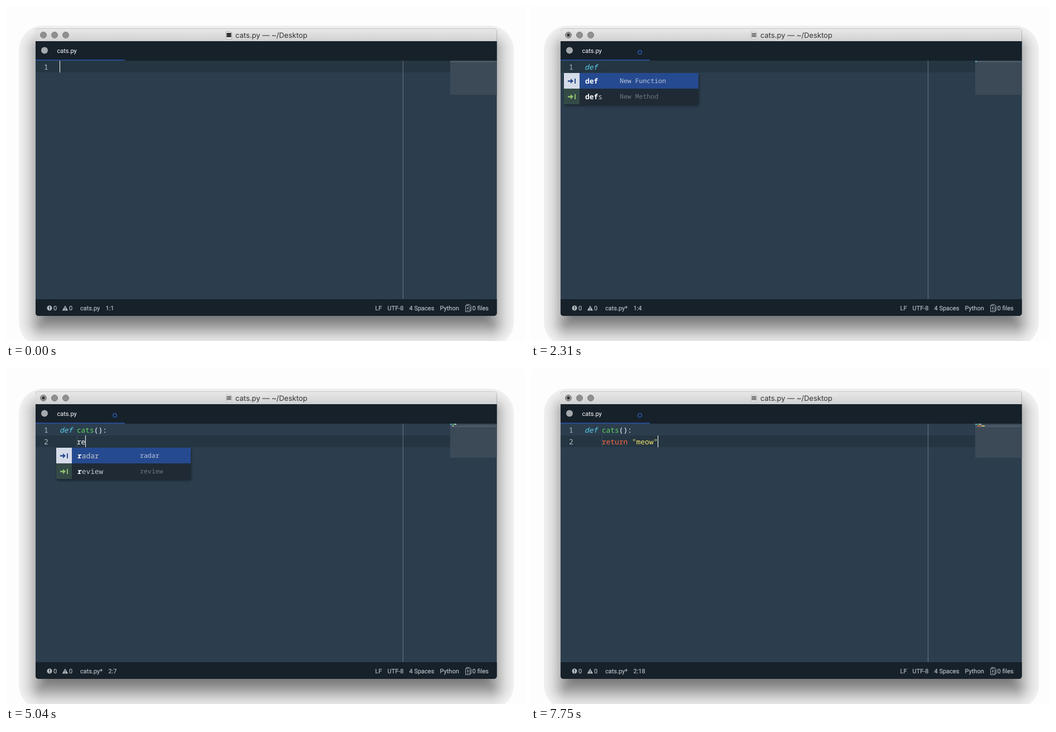
An HTML page for the animation above (8000 ms loop, 930 px wide and 600 px high).

```html
<!DOCTYPE html>
<html lang="en">
<head>
<meta charset="utf-8">
<title>Editor typing</title>
<style>
html, body { margin: 0; width: 100%; height: 100%; overflow: hidden; background: #fdfdfd; }
svg { display: block; width: 930px; height: 600px; text-rendering: geometricPrecision; }
text { white-space: pre; }
.title { font: 13px Inter, sans-serif; fill: #333; }
.ui { font: 11px Roboto, sans-serif; fill: #b5bcc0; stroke: #b5bcc0; stroke-width: .2px; }
.ui.tab { fill: #fff; stroke: none; }
.code { font: 500 12.87px "Noto Sans Mono", monospace; fill: #fff; }
.code .def { fill: #5cd1ee; font-style: italic; }
.code .fn { fill: #5fd35a; }
.code .ret { fill: #ff6743; }
.code .str { fill: #f4e26c; }
.num { font-weight: 400; fill: #b3bdc1; }
.word { font-weight: 400; fill: #c3c9cf; }
.word .hit { font-weight: 700; fill: #fff; }
.note { font: 11.53px "Noto Sans Mono", monospace; fill: #6c777f; }
.note.on { fill: #bcc8df; }
.popup { filter: drop-shadow(1px 2px 2px rgba(0, 0, 0, .4)); }
</style>
</head>
<body>
<svg viewBox="0 0 930 600">
  <defs>
    <linearGradient id="bar" x2="0" y2="1">
      <stop offset="0" stop-color="#e9e9e9"/><stop offset="1" stop-color="#d1d1d1"/>
    </linearGradient>
    <clipPath id="frame"><rect x="53" y="40" width="826.5" height="515" rx="5"/></clipPath>
  </defs>
  <g id="shadow"></g>
  <g clip-path="url(#frame)">
    <rect x="53" y="40" width="827" height="516" fill="#2c3e4e"/>
    <rect x="53" y="40" width="827" height="23" fill="url(#bar)"/>
    <rect x="53" y="40" width="827" height="1" fill="#c9c9c9"/>
    <g fill="#8f8f8f" stroke="#7f7f7f">
      <circle cx="67" cy="52" r="5.5"/><circle cx="87" cy="52" r="5.5"/><circle cx="107" cy="52" r="5.5"/>
    </g>
    <circle id="closeDot" cx="67" cy="52" r="2.4" fill="#2b2b2b"/>
    <g id="docIcon">
      <path d="M394.5 45.5h7l3 3v10.500h-10z" fill="#fafafa" stroke="#a5a5a5"/>
      <rect x="395.500" y="48" width="8" height="8" fill="#333"/>
    </g>
    <text class="title" x="411" y="57">cats.py — ~/Desktop</text>
    <rect x="53" y="63" width="827" height="35" fill="#17212a"/>
    <rect x="53" y="96" width="160" height="2" fill="#274b8f"/>
    <circle cx="69" cy="79.500" r="6" fill="#a4aaae"/>
    <text class="ui tab" x="91.500" y="84">cats.py</text>
    <circle id="tabDot" cx="195" cy="83" r="3.300" fill="none" stroke="#2a56a6" stroke-width="1.500"/>
    <g id="editor"></g>
    <rect x="53" y="525" width="827" height="31" fill="#17212a"/>
    <circle cx="78" cy="541" r="4.500" fill="#b5bcc0"/>
    <path d="M77.300 538h1.500v3.500h-1.500zM77.300 542.500h1.500v1.500h-1.500z" fill="#17212a"/>
    <path d="M106 536.500l5.200 9h-10.400z" fill="#b5bcc0"/>
    <path d="M105.400 539.500h1.200v3h-1.200zM105.400 543.300h1.200v1.200h-1.200z" fill="#17212a"/>
    <path d="M825.500 536.500v-2h5l3 3v8h-2M823.500 536.500h6l2 2v9h-8zM825.500 541h4M827.500 539v4M825.500 545h4" fill="none" stroke="#b5bcc0" stroke-width=".9"/>
    <g id="status"></g>
  </g>
</svg>
<script>
const LOOP = 8000, CHAR = 7.72, LEFT = 96, LINE = 21;
const $ = id => document.getElementById(id);
const rect = (x, y, w, h, fill, more = '') =>
  `<rect x="${x}" y="${y}" width="${w}" height="${h}" fill="${fill}" ${more}/>`;
const text = (cls, x, y, s) => `<text class="${cls}" x="${x}" y="${y}">${s}</text>`;

const snippets = {
  dc: 'Dictionary Comprehension', debug: 'debug', def: 'New Function', defs: 'New Method',
  class: 'New Class', combak: 'combak', radar: 'radar', review: 'review'
};
// x, width, description offset, typed letters, words
const popups = {
  d: [59, 273, 89, 'd', 'dc debug def defs'],
  de: [59, 241, 109, 'de', 'debug def defs'],
  def: [59, 241, 100, 'def', 'def defs'],
  c: [90, 241, 127, 'c', 'class combak'],
  ca: [90, 241, 127, 'ca', 'class combak'],
  r: [90, 241, 150, 'r', 'radar review'],
  re: [90, 241, 150, 're', 'review']
};

// time, text, column, popup, cursor hidden
const head = 'def cats():\n    ';
const steps = [
  [0, '', 1], [420, '', 1, '', 1],
  [710, 'd', 2, 'd'], [890, 'de', 3, 'de'], [1190, 'def', 4, 'def'],
  [1480, 'def', 4, 'def', 1], [1860, 'def', 4, 'def'], [2310, 'def', 4, 'def', 1],
  [2490, 'def ', 5], [2750, 'def c', 6, 'c'], [2930, 'def ca', 7, 'ca'],
  [3040, 'def cat', 8], [3160, 'def cats', 9],
  [3460, 'def cats()', 10], [3730, 'def cats()', 10, '', 1], [3940, 'def cats()', 11],
  [4300, 'def cats():', 12], [4570, head, 5],
  [4920, head + 'r', 6, 'r'], [5020, head + 're', 7, 'r'], [5130, head + 're', 7, 're'],
  [5340, head + 'ret', 8], [5460, head + 'retu', 9], [5580, head + 'return', 11],
  [5700, head + 'return ', 12], [6000, head + 'return ""', 13],
  [6170, head + 'return "m"', 14], [6290, head + 'return "me"', 15],
  [6560, head + 'return "meo"', 16], [6850, head + 'return "meow"', 17],
  [7030, head + 'return "meow"', 18], [7390, head + 'return "meow"', 18, '', 1],
  [7750, head + 'return "meow"', 18]
];
const MODIFIED = 1580, FADED = 1680;
const colors = { def: '#5cd1ee', fn: '#5fd35a', ret: '#ff6743', str: '#f4e26c', '': '#e8eef0' };

function tokens(line, twoLines) {
  return (line.match(/"\w*"|\w+|\s+|[^\w\s]/g) || []).map(s => [s,
    s === 'def' ? 'def' : s === 'return' ? 'ret' : s[0] === '"' ? 'str' :
    s === 'cats' && twoLines ? 'fn' : '']);
}

function markHits(word, typed) {
  let n = 0;
  return [...word].map(ch => ch === typed[n] ? (n++, `<tspan class="hit">${ch}</tspan>`) : ch).join('');
}

function drawPopup(key, row) {
  const [x, w, noteX, typed, list] = popups[key];
  const words = list.split(' '), top = 120 + row * LINE;
  let out = rect(x, top, w, words.length * 28 + 1, '#1f2a35', 'rx="1"');
  words.forEach((word, i) => {
    const y = top + i * 28, on = i === 0, ink = on ? '#264a90' : '#8fc06c';
    if (on) out += rect(x, y, w, 28, '#264a90');
    out += rect(x, y, 28, 28, on ? '#d5dbe8' : '#344a47');
    out += `<path d="M${x + 7} ${y + 13.2}h5v-3.200l5 4.500-5 4.500v-3.200h-5zM${x + 19} ${y + 10}h2v9h-2z" fill="${ink}"/>`;
    out += text('code word', x + 38, y + 19, markHits(word, typed));
    out += text('note' + (on ? ' on' : ''), x + noteX, y + 18, snippets[word]);
  });
  return `<g class="popup">${out}</g>`;
}

function drawEditor([, source, col, popup, hidden]) {
  const lines = source.split('\n'), row = lines.length - 1;
  let out = rect(53, 98 + row * LINE, 743, LINE, '#253642');
  out += rect(711, 98, 1, 427, '#677681');
  out += rect(796, 98, 84, 61, '#3c4a58') + rect(796, 98 + row * 3, 84, 3, '#4a5a66');
  if (row) out += rect(127, 119, 1, LINE, '#42545f');
  lines.forEach((line, i) => {
    const base = 114 + i * LINE;
    let at = 0, spans = '';
    for (const [s, cls] of tokens(line, row > 0)) {
      spans += `<tspan class="${cls}">${s}</tspan>`;
      if (s.trim()) out += rect(796 + at, 98 + i * 3, s.length, 2, colors[cls], 'opacity=".75"');
      at += s.length;
    }
    out += text('code num', 68, base, i + 1) + text('code', LEFT, base, spans);
  });
  if (!hidden) out += rect(Math.floor(LEFT + .28 + CHAR * (col - 1)), 98 + row * LINE, 1, LINE, '#fff');
  return out + (popup ? drawPopup(popup, row) : '');
}

function drawStatus([, source, col], modified) {
  const place = source.split('\n').length + ':' + col;
  return [[85, '0'], [113, '0'], [133, modified ? 'cats.py*' : 'cats.py'],
    [modified ? 183.5 : 178.5, place], [661.5, 'LF'], [683.5, 'UTF-8'], [722.5, '4 Spaces'],
    [777.5, 'Python'], [835.5, '0 files']].map(([x, s]) => text('ui', x, 545, s)).join('');
}

// Banded soft shadow: nested rounded boxes, darker towards the middle.
function drawShadow() {
  let out = '';
  for (let d = 30; d >= -27; d -= 3) {
    const alpha = .6 / (1 + Math.exp(1.7 * d / 22));
    const g = Math.round(253 * (1 - alpha));
    out += rect(53 - d, 65 - d, 827 + 2 * d, 515 + 2 * d, `rgb(${g},${g},${g})`, `rx="${Math.max(8, d + 14)}"`);
  }
  return out;
}

let shown = '';
function render(t) {
  const step = steps.filter(s => s[0] <= t).pop();
  const modified = t >= MODIFIED, faded = t >= FADED;
  const key = [step[0], modified, faded].join();
  if (key === shown) return;
  shown = key;
  $('editor').innerHTML = drawEditor(step);
  $('status').innerHTML = drawStatus(step, modified);
  $('closeDot').style.opacity = $('tabDot').style.opacity = modified ? 1 : 0;
  $('docIcon').style.opacity = faded ? .5 : modified ? .75 : 1;
}

$('shadow').innerHTML = drawShadow();
const start = performance.now();
function tick() {
  render((performance.now() - start) % LOOP);
  requestAnimationFrame(tick);
}
tick();
</script>
</body>
</html>
```
